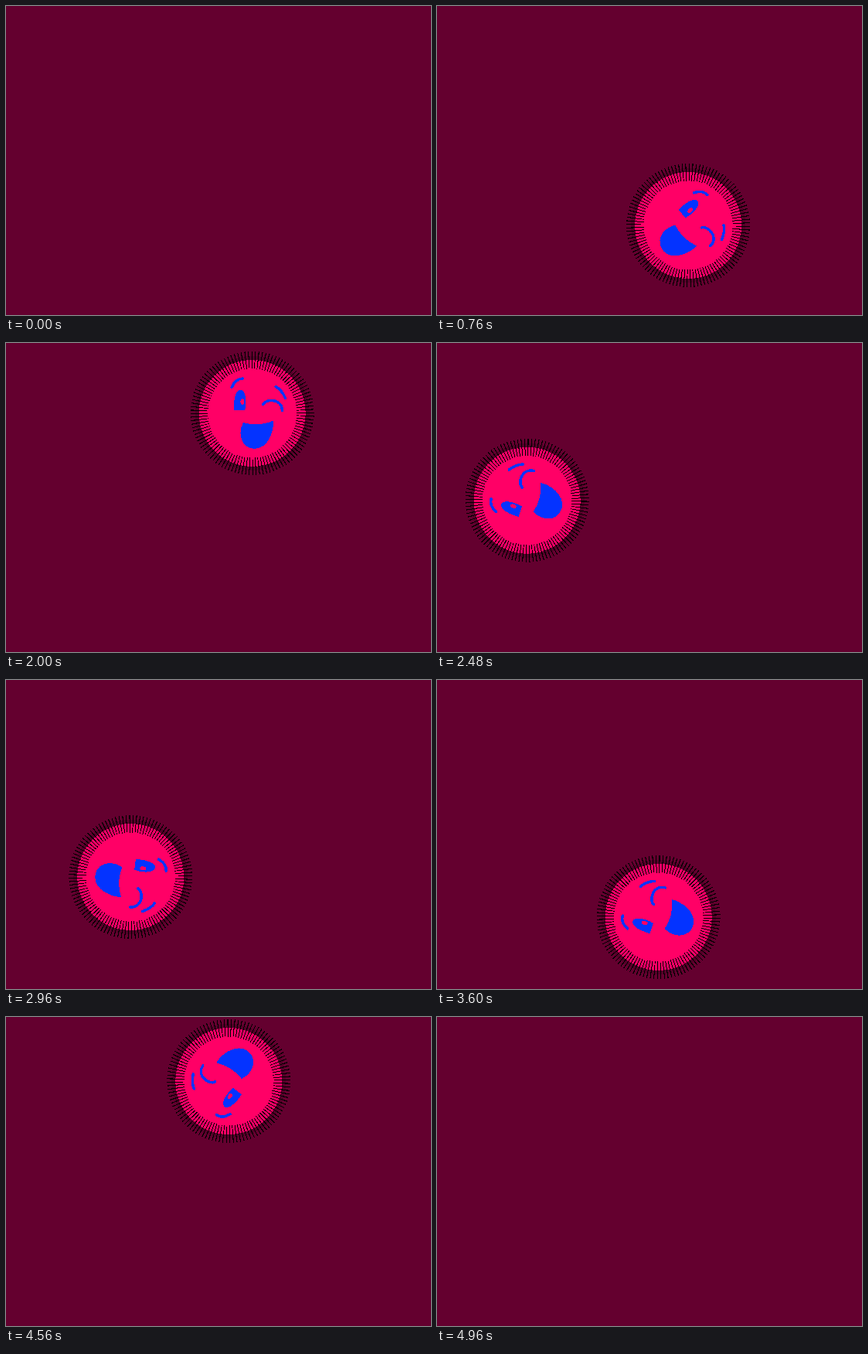
Write an HTML page that moves like this. It is 550 px wide and 400 px high and loops after 5000 ms.

```html
<!DOCTYPE html>
<html lang="en">
<head>
<meta charset="utf-8">
<title>Bouncing wink</title>
<style>
  html, body { margin: 0; width: 100%; height: 100%; overflow: hidden; background: #64002f; }
  svg { display: block; width: 550px; height: 400px; shape-rendering: crispEdges; }
  .skin { fill: #ff0066; }
  .ink { fill: #0433ff; }
  .line { fill: none; stroke: #0433ff; stroke-width: 3.5; stroke-linecap: round; }
  .rim, .ticks { fill: none; stroke: #000; }
  .rim { stroke-opacity: .15; stroke-width: 5; }
  .ticks { stroke-width: 22.5; stroke-dasharray: .26 .74; }
</style>
</head>
<body>
<svg viewBox="0 0 550 400">
  <g id="ball">
    <circle class="rim" r="71.5"/>
    <circle class="skin" r="69"/>
    <circle class="ticks" r="68.75" pathLength="108"/>
    <!-- open eye, mouth -->
    <path class="ink" d="M-23.5 -4.5C-24 -16 -22 -30 -15 -30.5C-8 -30 -6.5 -16 -9.5 -4Z"/>
    <ellipse class="skin" cx="-12.5" cy="-15" rx="2.5" ry="4"/>
    <path class="ink" d="M-12 12Q8 18 27 10C28 21 22 45 3 46C-12 46 -21 30 -12 12Z"/>
    <!-- brows, wink -->
    <path class="line" d="M-26 -34Q-21 -45 -12 -45"/>
    <path class="line" d="M31 -34Q39 -29 43 -19"/>
    <path class="line" d="M14 -11C17 -18 38 -20 39 -3" stroke-width="4"/>
  </g>
</svg>
<script>
const FRAME = 40, FRAMES = 125, REST_ANGLE = -24.8;
const LEFT = 83, RIGHT = 469.5, TOP = 81.5, BOTTOM = 320;  // reach of the ball's centre
const AWAY = { x: -74, y: -42 };
const SPIN_FLIP = 94;

// The ball flies straight between wall hits, one full turn per flight
const hits = [
  { at: 0, ...AWAY },
  { at: 14, x: 289, y: BOTTOM },
  { at: 39, x: RIGHT, y: 140 },
  { at: 49, x: 335.5, y: TOP },
  { at: 64, x: LEFT, y: 222.5 },
  { at: 94, x: 318, y: BOTTOM },
  { at: 109, x: RIGHT, y: 145.5 },
  { at: 124, ...AWAY }
];

const ball = document.getElementById('ball');
const mix = (a, b, k) => a + (b - a) * k;

function draw() {
  const frame = Math.floor(performance.now() / FRAME) % FRAMES;
  const next = Math.max(1, hits.findIndex(hit => hit.at >= frame));
  const from = hits[next - 1], to = hits[next];
  const k = (frame - from.at) / (to.at - from.at);
  const spin = from.at < SPIN_FLIP ? 360 : -360;
  ball.setAttribute('transform',
    `translate(${mix(from.x, to.x, k)} ${mix(from.y, to.y, k)}) rotate(${REST_ANGLE + spin * k})`);
  requestAnimationFrame(draw);
}
draw();
</script>
</body>
</html>
```
